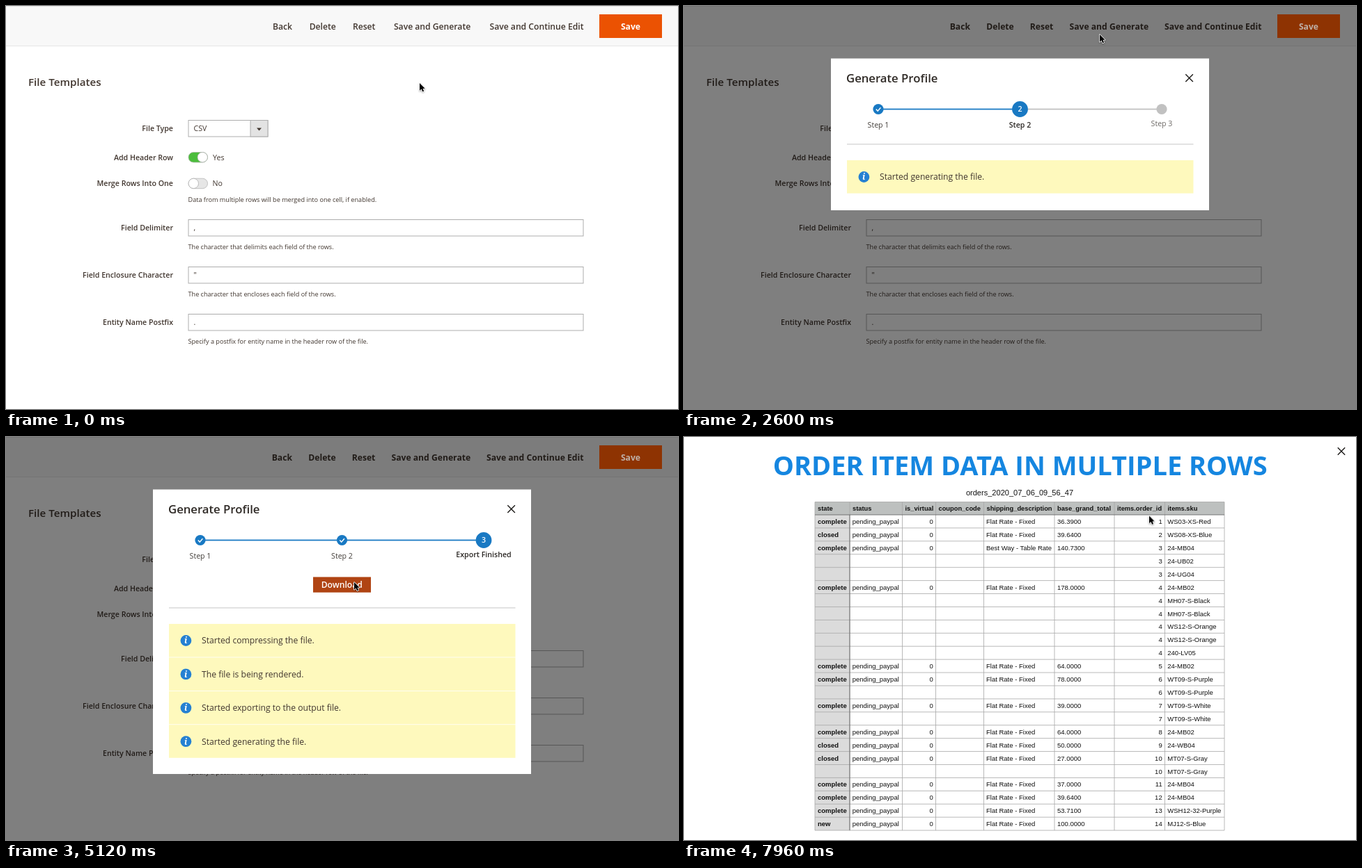
Recreate the animation shown at these times as an HTML page. Size 965 by 580 pixels, loop 8000 ms.

```html
<!DOCTYPE html>
<html lang="en">
<head>
<meta charset="utf-8">
<title>Export profile</title>
<style>
html, body { margin: 0; width: 100%; height: 100%; overflow: hidden; background: #fff; }
svg { display: block; width: 965px; height: 580px; font-family: "Open Sans", sans-serif; fill: #41362f; }
.end { text-anchor: end; }
.mid { text-anchor: middle; }
.semi { font-weight: 600; }
.bold { font-weight: 700; }
.menu { font-size: 12.16px; }
.label { font-size: 10.64px; }
.note { font-size: 9.12px; }
.box { fill: #fff; stroke: #adadad; }
.white { fill: #fff; }
.cross { fill: none; stroke: #1c1a18; stroke-width: 1.4; }
.sheet { font: 9.5px "Liberation Sans", Arial, sans-serif; fill: #111; }
.sheet .bold { font-weight: 700; }

/* hard switches, 1% = 80 ms */
.plain, .press, .heavy, .ring, .dim, .save, .saveText, .s1, .s2, .s3, .panel, .hover, .result {
  animation: 8s step-end infinite;
}
.plain { animation-name: plain; }
.press { animation-name: press; }
.heavy, .dim { animation-name: dim; }
.ring { animation-name: ring; }
.save { animation-name: save; }
.saveText { animation-name: saveText; }
.s1 { animation-name: s1; }
.s2 { animation-name: s2; }
.s3 { animation-name: s3; }
.panel { animation-name: panel; }
.hover { animation-name: hover; }
.result { animation-name: result; }
@keyframes plain { 0% { visibility: visible } 21% { visibility: hidden } }
@keyframes press { 0% { visibility: visible } 13.5% { visibility: hidden } }
@keyframes dim { 0% { visibility: hidden } 21% { visibility: visible } 72.5% { visibility: hidden } }
@keyframes ring { 0% { opacity: 0 } 13.5% { opacity: .5 } 14% { opacity: 1 } 21% { opacity: 0 } }
@keyframes save { 0% { fill: #eb5202 } 21% { fill: #8e3302 } }
@keyframes saveText { 0% { fill: #fff } 21% { fill: #bfb0a7 } }
@keyframes s1 { 0% { visibility: hidden } 21% { visibility: visible } 32.5% { visibility: hidden } }
@keyframes s2 { 0% { visibility: hidden } 32.5% { visibility: visible } 44% { visibility: hidden } }
@keyframes s3 { 0% { visibility: hidden } 44% { visibility: visible } 72.5% { visibility: hidden } }
@keyframes panel { 0% { height: 170.5px } 32.5% { height: 218.5px } 44% { height: 409.5px } }
@keyframes hover { 0% { fill: #eb5202 } 61% { fill: #b04413 } }
@keyframes result { 0% { visibility: hidden } 72.5% { visibility: visible } }

.cursor { animation: travel 8s infinite; filter: drop-shadow(0 1px .8px rgba(0,0,0,.35)); }
.dip { animation: dip 8s infinite; }
@keyframes travel {
  0% { transform: translate(594px, 111px) }
  5.25% { transform: translate(594px, 111px); animation-timing-function: cubic-bezier(.42,0,.58,1) }
  10.5% { transform: translate(597px, 41px) }
  45% { transform: translate(597px, 41px); animation-timing-function: cubic-bezier(.5,0,.45,1) }
  58% { transform: translate(500px, 209px) }
  75.75% { transform: translate(500px, 209px); animation-timing-function: cubic-bezier(.5,0,.5,1) }
  86% { transform: translate(212px, 116px); animation-timing-function: cubic-bezier(.65,0,.35,1) }
  99.5%, 100% { transform: translate(668px, 113.5px) }
}
@keyframes dip {
  0%, 86% { transform: translateY(0); animation-timing-function: ease-in-out }
  91% { transform: translateY(4.5px); animation-timing-function: ease-in-out }
  96.5%, 100% { transform: translateY(0) }
}
</style>
</head>
<body>
<svg viewBox="0 0 965 580">
  <rect width="965" height="580" fill="#fff"/>
  <rect width="965" height="58" fill="#f8f8f8"/>
  <path d="M0 .5H965M0 57.5H965" stroke="#e6e6e6"/>

  <rect class="ring" x="542.5" y=".5" width="135" height="57" rx="4" fill="#fff" stroke="#1a84d6"
    style="filter:drop-shadow(0 0 2px rgba(0,123,219,.4))"/>
  <g id="menu" class="menu end"></g>

  <text x="32" y="114.8" class="semi" font-size="15.2">File Templates</text>
  <g id="form"></g>

  <rect x="262" y="164.5" width="114" height="23.5" class="box"/>
  <rect x="351" y="164.5" width="25" height="23.5" fill="#e3e3e3" stroke="#adadad"/>
  <path d="M360 175.5h7l-3.5 4z"/>
  <text x="269.5" y="180" class="label">CSV</text>

  <rect x="262" y="210.5" width="27.5" height="14.5" rx="7.25" fill="#4bbd3c" stroke="#a9b8a5" stroke-width=".8"/>
  <circle cx="282.2" cy="217.7" r="7.2" class="box" stroke-width=".8"/>
  <text x="297" y="221.5" class="label">Yes</text>
  <rect x="262" y="248.2" width="27.5" height="14.5" rx="7.25" fill="#e6e6e6" stroke="#b5b5b5" stroke-width=".8"/>
  <circle cx="269.3" cy="255.4" r="7.2" class="box" stroke-width=".8"/>
  <text x="296.5" y="259.2" class="label">No</text>

  <rect class="dim" width="965" height="580" fill="#000" fill-opacity=".5"/>
  <rect class="save" x="852" y="12" width="90" height="34"/>
  <text x="897" y="34" class="menu bold mid saveText">Save</text>

  <g class="dim">
    <rect class="panel" x="211" y="75.5" width="543" height="170.5" fill="#fff"/>
    <text x="233" y="109.6" class="semi" font-size="16.72" fill="#2f2a26">Generate Profile</text>
    <path class="cross" d="M720.3 98.3l10.6 10.6m0-10.6l-10.6 10.6"/>
  </g>
  <g id="steps"></g>

  <g class="result">
    <rect width="965" height="580" fill="#fff"/>
    <path class="cross" d="M938.8 15.3l10.4 10.4m0-10.4l-10.4 10.4"/>
    <text x="482.7" y="55.4" class="bold mid" font-size="38" fill="#1586e0">ORDER ITEM DATA IN MULTIPLE ROWS</text>
    <g id="sheet" class="sheet"></g>
  </g>

  <g class="cursor"><g class="dip">
    <path d="M0 0V10.7L2.5 8.4 4.2 12.3 6.1 11.5 4.5 7.7H7.7Z" fill="#000" stroke="#fff" stroke-width="1.5"
      paint-order="stroke" stroke-linejoin="round"/>
  </g></g>
</svg>
<script>
const put = (id, html) => { document.getElementById(id).innerHTML = html; };
const text = (x, y, s, cls = "", extra = "") => `<text x="${x}" y="${y}" class="${cls}" ${extra}>${s}</text>`;
const rect = (x, y, w, h, extra) => `<rect x="${x}" y="${y}" width="${w}" height="${h}" ${extra}/>`;

// top menu: light while idle, heavy behind the dialog
const menu = [[411, "Back"], [473.8, "Delete"], [530.4, "Reset"], [667.2, "Save and Generate"], [829.5, "Save and Continue Edit"]];
put("menu", menu.map(([x, s], i) => {
  const light = text(x, 34, s, "semi " + (i === 3 ? "press" : "plain"));
  const heavy = i === 3 ? `<g class="ring">${text(x, 34, s, "bold")}</g>` : "";
  return light + heavy + text(x, 34, s, "bold heavy");
}).join(""));

// form rows: label, baseline, note, value
const rows = [
  ["File Type", 180],
  ["Add Header Row", 221.5],
  ["Merge Rows Into One", 259.2, "Data from multiple rows will be merged into one cell, if enabled."],
  ["Field Delimiter", 323, "The character that delimits each field of the rows.", ","],
  ["Field Enclosure Character", 391, "The character that encloses each field of the rows.", "&quot;"],
  ["Entity Name Postfix", 458.7, "Specify a postfix for entity name in the header row of the file.", "."]
];
put("form", rows.map(([label, y, note, value]) => {
  let out = text(240, y, label, "label semi end");
  if (value) out += rect(262, Math.round(y) - 15.5, 567, 23.5, 'class="box"') + text(269.5, y, value, "label");
  if (note) out += text(261.5, y + (value ? 26.8 : 22.8), note, "note");
  return out;
}).join(""));

// dialog: three stages of the stepper
const BLUE = "#1979c3", GRAY = "#c1c1c1", stops = [279, 482.5, 686];
function stepper(now) {
  let out = "";
  for (let i = 0; i < 2; i++)
    out += rect(stops[i], 147.6, 203.5, 1.8, `fill="${i + 1 < now ? BLUE : GRAY}"`);
  stops.forEach((x, i) => {
    const n = i + 1, on = n === now, done = n < now;
    out += `<circle cx="${x}" cy="148.5" r="${on ? 11.4 : 7.6}" fill="${on || done ? BLUE : GRAY}"/>`;
    if (on) out += text(x, 152.3, n, "label semi mid white");
    if (done) out += `<path d="M${x - 3.2} 148.6l2.4 2.5 4.2-4.8" fill="none" stroke="#fff" stroke-width="1.4"/>`;
    const name = on && n === 3 ? "Export Finished" : "Step " + n;
    out += text(x, n === 3 ? 173.4 : 174.9, name, "label mid" + (on ? " semi" : ""),
      `fill="${on ? "#2b2724" : done ? "#45403c" : "#6e6a67"}"`);
  });
  return out;
}
function log(top, list) {
  return rect(234, top - 23.7, 497.5, 1.2, 'fill="#cfcfcf"') + list.map((s, i) => {
    const y = top + i * 48.4;
    return rect(234, y, 497.5, 47.6, 'fill="#fef9bd"') +
      `<circle cx="258.4" cy="${y + 24}" r="7.9" fill="#2580d2"/>` +
      text(258.2, y + 28.4, "i", "mid white bold", 'font-family="Noto Serif, serif" font-style="italic" font-size="12"') +
      text(281, y + 28.4, s, "menu");
  }).join("");
}
const done = ["Started compressing the file.", "The file is being rendered.",
  "Started exporting to the output file.", "Started generating the file."];
put("steps",
  `<g class="s1">${stepper(1)}</g>` +
  `<g class="s2">${stepper(2)}${log(222, done.slice(3))}</g>` +
  `<g class="s3">${stepper(3)}${log(269, done)}` +
  rect(441, 201.5, 83, 22.2, 'class="hover"') + text(482.3, 217, "Download", "menu semi mid white") + "</g>");

// spreadsheet
const cols = [188, 238, 313.5, 361.5, 430.5, 532, 618, 690.5, 776];
const heads = "state status is_virtual coupon_code shipping_description base_grand_total items.order_id items.sku".split(" ");
const orders = [
  "complete 36.3900 WS03-XS-Red", "closed 39.6400 WS08-XS-Blue",
  "complete 140.7300 24-MB04 24-UB02 24-UG04",
  "complete 178.0000 24-MB02 MH07-S-Black MH07-S-Black WS12-S-Orange WS12-S-Orange 240-LV05",
  "complete 64.0000 24-MB02", "complete 78.0000 WT09-S-Purple WT09-S-Purple",
  "complete 39.0000 WT09-S-White WT09-S-White", "complete 64.0000 24-MB02",
  "closed 50.0000 24-WB04", "closed 27.0000 MT07-S-Gray MT07-S-Gray",
  "complete 37.0000 24-MB04", "complete 39.6400 24-MB04",
  "complete 53.7100 WSH12-32-Purple", "new 100.0000 MJ12-S-Blue"
];
const TOP = 112, ROW = 18.92, END = TOP + 24 * ROW;
let sheet = text(482, 84.3, "orders_2020_07_06_09_56_47", "mid", 'font-size="11.05"') +
  rect(188, 93.5, 588, 18.5, 'fill="#bdc0bf"') + rect(188, TOP, 50, END - TOP, 'fill="#dbdbdb"');
let lines = "M188 93.5H776";
for (let i = 1; i <= 24; i++) lines += `M188 ${TOP + i * ROW}H776`;
cols.forEach(x => { lines += `M${x} 93.5V${END}`; });
sheet += `<path d="${lines}" stroke="#a8a8a8" stroke-width=".8"/>` +
  `<path d="M188 112H776M238 112V${END}" stroke="#5c5c5c" stroke-width=".8"/>`;
heads.forEach((s, i) => { sheet += text(cols[i] + 4, 106.4, s, "bold", 'font-size="9.3"'); });
let line = 0;
orders.forEach((order, k) => {
  const [state, total, ...items] = order.split(" ");
  items.forEach((sku, i) => {
    const y = TOP + (line++ + .5) * ROW + 3.6;
    if (!i) sheet += text(192, y, state, "bold") + text(241.7, y, "pending_paypal") + text(357.7, y, 0, "end") +
      text(434, y, k === 2 ? "Best Way - Table Rate" : "Flat Rate - Fixed") + text(536, y, total);
    sheet += text(686.7, y, k + 1, "end") + text(694.3, y, sku);
  });
});
put("sheet", sheet);
</script>
</body>
</html>
```
